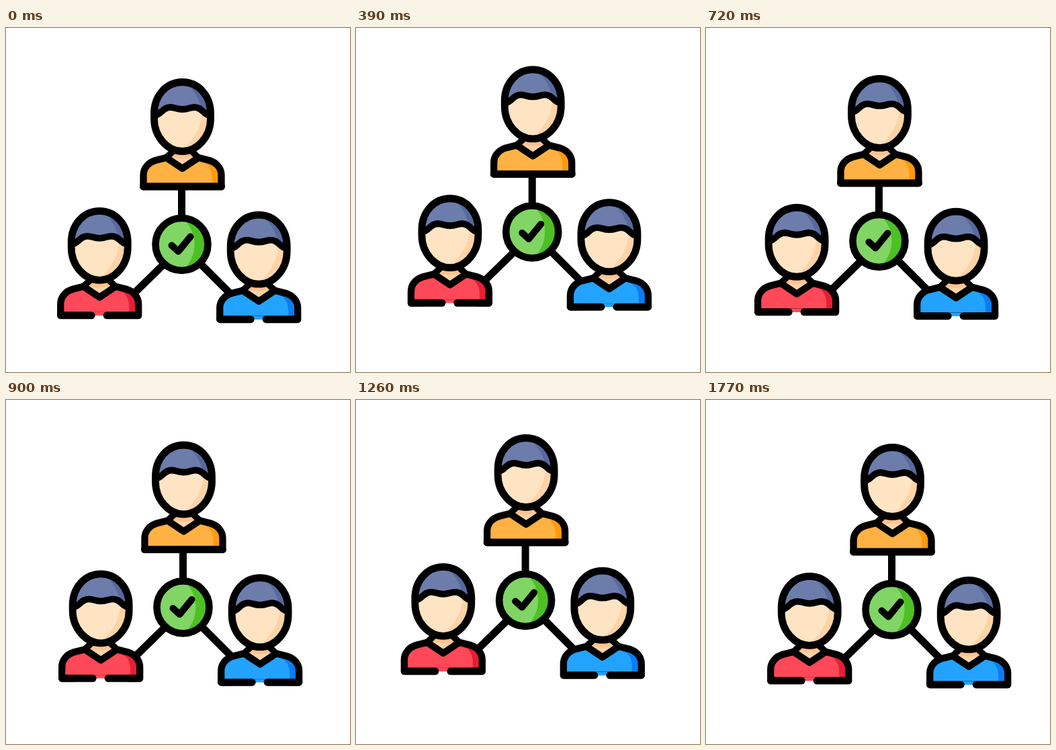
An HTML page with a canvas for the animation above (1.8 s loop, 512 by 512 pixels).

```html
<!DOCTYPE html>
<html lang="en">
<head>
<meta charset="utf-8">
<title>Team network</title>
<style>
html, body { margin: 0; width: 100%; height: 100%; overflow: hidden; background: #fff; }
canvas { display: block; width: 100%; height: 100%; }
</style>
</head>
<body>
<canvas id="stage" width="512" height="512"></canvas>
<script>
const ctx = document.getElementById('stage').getContext('2d');
const LOOP = 1800, STEP = 30;

// Drift of the whole drawing: [time, offset]
const driftX = [[0, 0], [140, 5], [240, 3.5], [540, -2.3], [670, -5], [890, 2],
  [1080, -4.5], [1245, -9.5], [1530, 10.7], [1620, 16.7], [1690, 18], [1770, 15]];
const driftY = [[0, 0], [240, -10], [450, -20], [540, -18], [710, -5], [900, -13.5],
  [1080, -21], [1260, -24], [1400, -30], [1530, -26], [1620, -18.2], [1770, -10]];

// Smooth curve through the keys; flat at turning points
function sample(keys, t) {
  const last = keys.length - 1;
  let i = 0;
  while (i < last - 1 && t > keys[i + 1][0]) i++;
  const rise = k => (keys[k + 1][1] - keys[k][1]) / (keys[k + 1][0] - keys[k][0]);
  const slope = k => {
    if (k === 0) return rise(0);
    if (k === last) return rise(last - 1);
    const a = rise(k - 1), b = rise(k);
    return a * b <= 0 ? 0 : 2 * a * b / (a + b);
  };
  const [t0, a] = keys[i], [t1, b] = keys[i + 1];
  const d = t1 - t0, u = (t - t0) / d, v = 1 - u;
  return a * v * v * (1 + 2 * u) + b * u * u * (3 - 2 * u)
    + d * u * v * (v * slope(i) - u * slope(i + 1));
}

// One person, centred on x = 0 with the base bar on y = 0
const head = new Path2D('M-42-109C-42-135-24-155.5 0-155.5S42-135 42-109V-101C42-74 22-52.5 0-52.5S-42-74-42-101Z');
const hair = new Path2D('M-42-106C-31-106-32-118-19-118C-12-118-9-114.5 0-114.5S12-118 19-118C32-118 31-106 42-106V-160H-42Z');
const fringe = new Path2D('M-41-106C-31-107-30-118-18-118C-11-118-9-115 0-115S11-118 18-118C30-118 31-107 41-106');
const neck = new Path2D('M-15-56V-51L-24-43L0-27L24-43L15-51V-56Z');
const neckShade = new Path2D('M-26-56V-45C-12-41 12-41 26-45V-56Z');
const shirt = new Path2D('M-58 0V-17C-58-28-50-36-40-39L-24-43L0-27L24-43L40-39C50-36 58-28 58-17V0Z');
const shirtLight = new Path2D('M-70 10V-60H16L24-38C37-36 44-28 44-13V10Z');
const faceLight = new Path2D('M-50-160H0C14-146 28-132 29-108C27-84 14-66-4-52H-50Z');
const sides = new Path2D('M-15-51.5L-24-43M15-51.5L24-43');

const disc = new Path2D('M39 0A39 39 0 1 1-39 0A39 39 0 1 1 39 0Z');
const discLight = new Path2D('M-45-45H-6C10-34 19-18 19 0S10 34-6 45H-45Z');
const tick = new Path2D('M-15 1.5L-5 10.5L13-11.5');
const links = new Path2D('M0-86V-38M-26 29L-72 74M27 28L72 73');

function fillIn(clip, parts) {
  ctx.save();
  ctx.clip(clip);
  for (const [path, color] of parts) {
    ctx.fillStyle = color;
    ctx.fill(path);
  }
  ctx.restore();
}

function ink(path, width) {
  ctx.lineWidth = width;
  ctx.stroke(path);
}

function bar(x0, x1) {
  ctx.lineWidth = 11;
  ctx.beginPath();
  ctx.moveTo(x0, 0);
  ctx.lineTo(x1, 0);
  ctx.stroke();
}

function person(x, y, light, dark, split) {
  ctx.save();
  ctx.translate(x, y);
  fillIn(shirt, [[shirt, dark], [shirtLight, light]]);
  fillIn(neck, [[neck, '#fed4a8'], [neckShade, '#ffc290']]);
  ctx.save();
  if (split) {
    // leave the bottom edge open between the two bars
    ctx.beginPath();
    ctx.rect(-80, -80, 160, 75);
    ctx.rect(-80, -10, 40, 20);
    ctx.rect(40, -10, 40, 20);
    ctx.clip();
  }
  ink(shirt, 10.3);
  ctx.restore();
  ink(sides, 9.5);
  fillIn(head, [[head, '#fed3a6'], [faceLight, '#fee4c3']]);
  ctx.save();
  ctx.clip(head);
  fillIn(hair, [[hair, '#566a9f'], [faceLight, '#6d7dab']]);
  ctx.restore();
  ink(fringe, 9.8);
  ink(head, 10.8);
  if (split) {
    bar(-57.5, -12);
    bar(11, 57.5);
  } else {
    bar(-58, 58);
  }
  ctx.restore();
}

function draw(t) {
  ctx.setTransform(1, 0, 0, 1, 0, 0);
  ctx.fillStyle = '#fff';
  ctx.fillRect(0, 0, 512, 512);
  ctx.strokeStyle = '#000';
  ctx.lineCap = ctx.lineJoin = 'round';
  ctx.translate(261.5 + sample(driftX, t), 322 + sample(driftY, t));
  ink(links, 11);
  person(1, -86, '#ffb143', '#ff9a0c', false);
  person(-122.3, 105.8, '#ff4858', '#e61e35', true);
  person(114.7, 111.7, '#22a3ff', '#0b7cf4', true);
  fillIn(disc, [[disc, '#4dc024'], [discLight, '#80d564']]);
  ink(disc, 10.6);
  ink(tick, 10);
}

function frame() {
  draw(Math.floor(performance.now() % LOOP / STEP) * STEP);
  requestAnimationFrame(frame);
}
frame();
</script>
</body>
</html>
```
